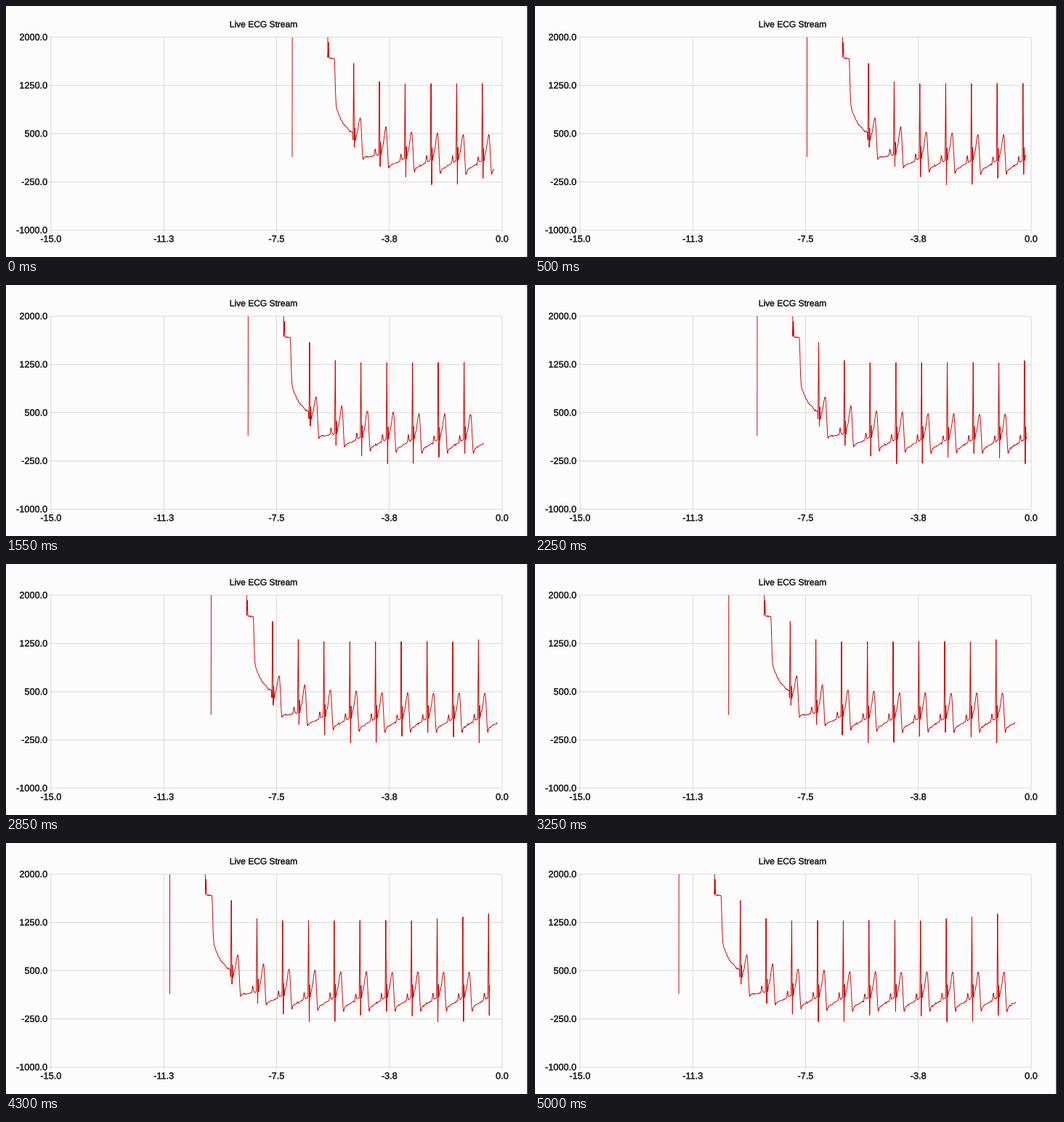
A matplotlib script that plays this animation: 720 px wide and 346 px high, repeating every 5050 ms.

```python
import numpy as np
import matplotlib as mpl
import matplotlib.pyplot as plt
from matplotlib.animation import FuncAnimation
from matplotlib.patches import Rectangle
from matplotlib.patheffects import withStroke

W, H, DPI = 720, 346, 100
PX = 72 / DPI
LEFT, RIGHT, TOP, BOTTOM = 62, 683, 43, 309
FRAMES, INTERVAL = 101, 50

SAMPLE = (RIGHT - LEFT) / 15 / 130   # px per sample: 130 Hz on a 15 s axis
BATCH = 73 * SAMPLE                  # data arrives 73 samples at a time
FIRST_END, BATCHES = 278, 8
FIRST_BEAT, BEAT_SAMPLES, BEATS = 266, 111.25, 11

START_X, SPEED = 394, 0.0392         # px, px per ms
STALLS = [(100, 400), (3850, 3950)]  # ms
BATCH_MS, BATCH_LEAD = 625, 300

mpl.rcParams.update({"path.simplify": False, "path.snap": False,
                     "font.family": "Liberation Sans"})


def ease(a, b, u):
    u = np.clip(u, 0, 1)
    return a + (b - a) * u * u * (3 - 2 * u)


def settling(x):
    """Start-up: off-scale overshoot, plateau, then decay to the baseline."""
    fall = np.maximum(x - 58, 0)
    y = 182 - 52 * np.exp(-fall / 13) - 58 * np.exp(-(fall / 1.5) ** 2)
    y -= 22 * np.exp(-((x - 49.9) / 0.5) ** 2)
    y = np.where(x < 49, -200, y)
    return np.where(x < 0.2, 208, y)


def beat(n, k):
    """Height of beat k at n samples from its R peak."""
    p = n * SAMPLE
    settle = np.exp(-0.8 * k)
    drift = -27 * np.exp(-1.1 * (k + p / 35.4))
    r = 107.5 - 27.5 * np.exp(-2 * k) - 9.5 * (k / 10) ** 6
    s = 240 - 42 * np.exp(-1.3 * k) + 8 * np.sin(2 * np.pi * (k - 2.2) / 5)
    t_peak, dip = 178 - 24 * settle, 233 - 22 * settle

    offset = -27 * np.exp(-1.1 * k)
    qrs = np.interp(n, [-3, 0, 3, 5, 7, 13],
                    [212 + offset, r, s, 196 + offset, 213 + offset, 203 + offset])
    t_wave = np.where(p < 9, ease(203 + offset, t_peak, (p - 4) / 5),
                      ease(t_peak, dip, (p - 9) / 4))
    rest = np.maximum(p - 13, 0)
    ramp = 225 - 12 * (rest / 22) ** 1.3 + drift
    p_wave = 9 * np.exp(-((p - 29.6) / 0.9) ** 2)
    diastole = ramp + (dip - ramp) * np.exp(-rest / 1.2) - p_wave
    return np.where(n < 13, qrs, np.where(p < 13, t_wave, diastole))


def build_signal():
    n = np.arange(int((FIRST_END + BATCHES * BATCH) / SAMPLE) + 2)
    y = settling(n * SAMPLE)
    for k in range(BEATS):
        peak = FIRST_BEAT + round(k * BEAT_SAMPLES)
        y[peak - 3:] = beat(n[peak - 3:] - peak, k)
    coarse = np.arange(0, n[-1] + 4, 3)
    noise = np.random.default_rng(4).normal(0, 0.6, len(coarse))
    return n * SAMPLE, y + np.interp(n, coarse, noise)


signal_x, signal_y = build_signal()

fig = plt.figure(figsize=(W / DPI, H / DPI), dpi=DPI, facecolor="#fcfcfc")
ax = fig.add_axes([0, 0, 1, 1])
ax.set_xlim(0, W)
ax.set_ylim(H, 0)
ax.axis("off")


def label(x, y, text, size, ha="center"):
    ax.text(x, y, text, size=size * PX, color="#222222", ha=ha, va="baseline",
            path_effects=[withStroke(linewidth=0.25, foreground="#222222")])


def rule(xs, ys):
    ax.plot(xs, ys, color="#d9d9d9", lw=PX, solid_capstyle="butt")


for i in range(5):
    x = LEFT + (RIGHT - LEFT) * i / 4
    y = TOP + (BOTTOM - TOP) * i / 4
    rule([LEFT - 4, RIGHT], [y, y])
    rule([x, x], [TOP, BOTTOM + 4])
    label(57.5, y + 4.2, f"{2000 - 750 * i:.1f}", 12.7, "right")
    # Half-way tenths round away from zero, as in -11.25 -> -11.3.
    label(x, 325.2, f"{-15 + 3.75 * i - 0.01 * (i < 4):.1f}", 12.7)
label(354.5, 29.2, "Live ECG Stream", 12)

# Window edge on the right.
ax.add_patch(Rectangle((717.4, 0), 3, H, color="#1c1d20", lw=0))

trace, = ax.plot([], [], color="#d00000", lw=0.95 * PX, solid_joinstyle="round")
trace.set_clip_path(Rectangle((LEFT, TOP - 0.5), RIGHT - LEFT, BOTTOM - TOP,
                              transform=ax.transData))


def clock(t):
    for begin, end in STALLS:
        if begin < t <= end:
            return begin
    return t


def update(frame):
    t = clock(frame * INTERVAL)
    start = START_X - SPEED * t
    end = FIRST_END + BATCH * ((t + BATCH_LEAD) // BATCH_MS)
    shown = signal_x <= end
    trace.set_data(start + signal_x[shown], signal_y[shown])
    return trace,


anim = FuncAnimation(fig, update, frames=FRAMES, interval=INTERVAL,
                     repeat=True, repeat_delay=0)
plt.show()
```
